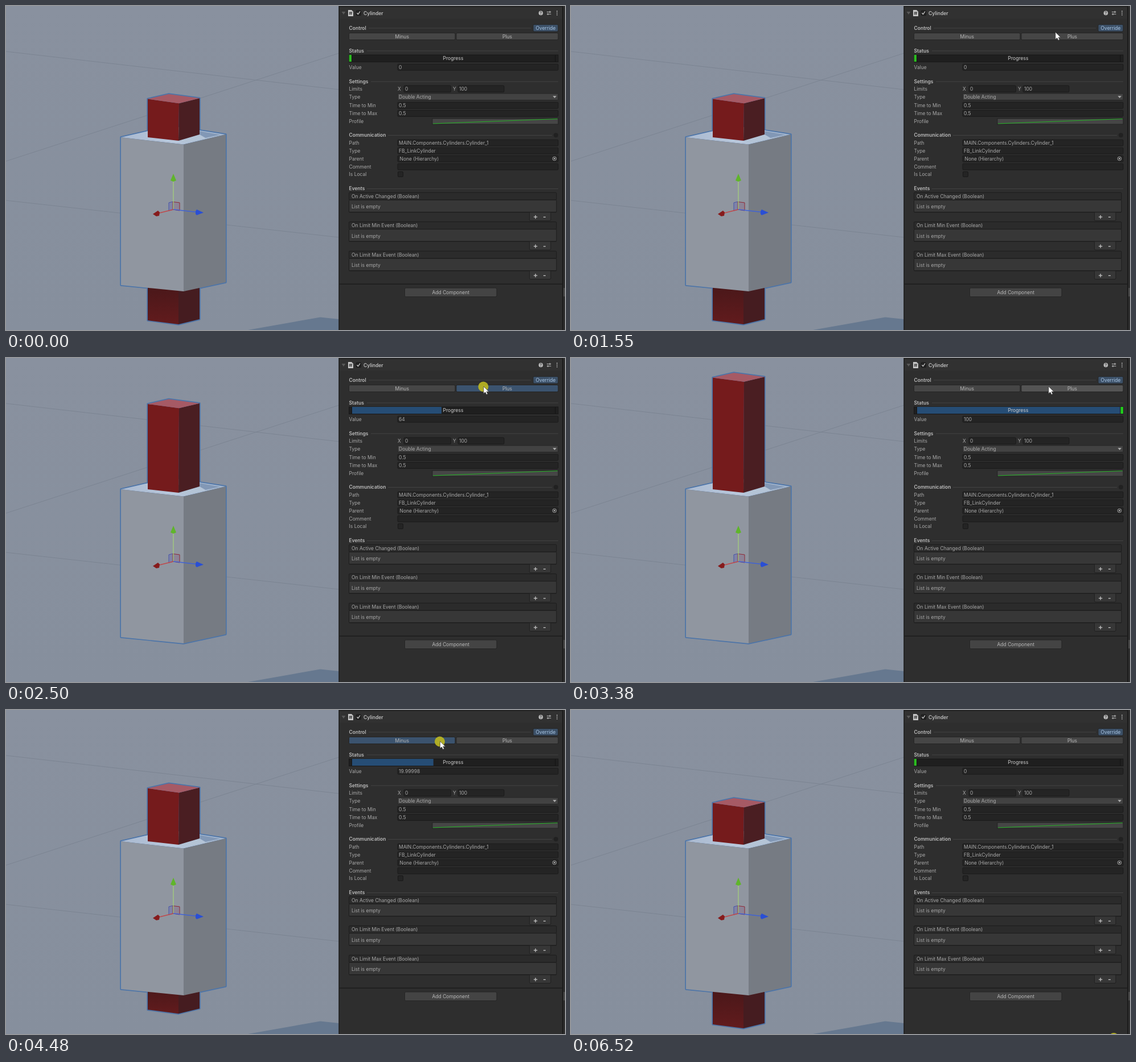
Recreate the animation shown at these times as an HTML page. Size 982 px wide and 570 px high, loop 6.65 s.

```html
<!DOCTYPE html>
<html lang="en">
<head>
<meta charset="utf-8">
<title>Cylinder inspector</title>
<style>
html, body { margin: 0; width: 100%; height: 100%; overflow: hidden; background: #2e2e2e; }
svg { display: block; width: 982px; height: 570px; }
text { font: 8.5px Inter, "Liberation Sans", sans-serif; fill: #a9a9a9; white-space: pre; }
.bold { font-weight: 600; fill: #bdbdbd; }
.mid { text-anchor: middle; }
</style>
</head>
<body>
<svg id="stage" viewBox="0 0 982 570">
  <defs>
    <linearGradient id="sky" x1="0" y1="0" x2="0" y2="1">
      <stop offset="0" stop-color="#89919f"/><stop offset="1" stop-color="#868f9d"/>
    </linearGradient>
    <linearGradient id="rim" x1="0" y1="0" x2="1" y2="0">
      <stop offset="0" stop-color="#a9b9d0"/><stop offset=".5" stop-color="#b9c8dc"/>
      <stop offset="1" stop-color="#9fb2ca"/>
    </linearGradient>
    <linearGradient id="shade" x1="0" y1="0" x2="0" y2="1">
      <stop offset="0" stop-color="#451719"/><stop offset="1" stop-color="#621b1d"/>
    </linearGradient>
  </defs>
  <g id="scene"></g>
  <g id="panel"></g>
  <g id="pointer"></g>
</svg>
<script>
const NS = "http://www.w3.org/2000/svg";
const LOOP = 6650;
const $ = id => document.getElementById(id);
let layer = $("scene");

function add(tag, attrs, label) {
  const el = document.createElementNS(NS, tag);
  for (const k in attrs) el.setAttribute(k, attrs[k]);
  if (label !== undefined) el.textContent = label;
  return layer.appendChild(el);
}
const poly = (points, fill, more) => add("polygon", { points, fill, ...more });
const path = (d, stroke, width = 1, fill = "none") =>
  add("path", { d, stroke, "stroke-width": width, fill });
const fillBox = (x, y, x2, y2, fill) => add("rect", { x, y, width: x2 - x, height: y2 - y, fill });
const box = (x, y, x2, y2, fill, stroke = "#1b1b1b", rx = 1.5) =>
  add("rect", { x: x + .5, y: y + .5, width: x2 - x - 1, height: y2 - y - 1, fill, stroke, rx });
const text = (x, y, s, cls = "") => add("text", { x, y: y + 3.1, class: cls }, s);

// ---- scene ----
const EDGE = "#4c74a8";
const outline = { stroke: EDGE, "stroke-width": 3.4, "stroke-linejoin": "round" };
fillBox(0, 0, 585, 570, "url(#sky)");
path("M0 80L585 147M0 273L585 83M0 342L585 407", "#78818f", .8);
poly("425,570 552,547.5 585,551 585,570", "#66788f");

const rodEdge = poly("", EDGE, outline);
poly("202,231 289,211 386,226 386,486 312,502 202,491", EDGE, outline);
const lowLeft = poly("", "url(#shade)");
const lowRight = poly("", "#451c20");
poly("202,231 289,211 386,226 312,243.5", "url(#rim)");
poly("303,237 340,220 376,226.5 318,239", "#8298b6");
poly("303,237 340,226 352,233 316,240", "#b4c4d6");
poly("202,231 312,243.5 312,502 202,491", "#9096a0");
poly("312,243.5 386,226 386,486 312,502", "#767b83");
const rodLeft = poly("", "#751b1c");
const rodRight = poly("", "#4a1e22");
const rodTop = poly("", "#a65a65");

// move handles
poly("286,346 294,344 294,358 286,360", "#6f75b0", { "fill-opacity": .55, stroke: "#4854a8", "stroke-width": 1 });
poly("293,344.5 305,346 305,360 293,358", "#88708c", { "fill-opacity": .5, stroke: "#8e2734", "stroke-width": 1 });
path("M294 358V307", "#a4cf7c", 1.3);
path("M294 358L268 364.5", "#c0484a", 1.3);
path("M294 358L334 362.5", "#3f62d6", 1.3);
poly("294,295 299,307 294,309 289,307", "#5fb52a");
poly("258,366 267,360 270,363 269,369 264,370", "#861b1c");
poly("347,363.5 335,358 333,361 333,366 335,368", "#2a4fd4");

function drawRod(v) {
  const top = 155 - 1.29 * v, end = 553 - 1.29 * v;
  const a = `249,${top + 8.5}`, b = `304,${top + 16.3 - v * .006}`, c = `340,${top + 7.2}`;
  const back = `286,${top}`;
  const low = Math.max(end, 480);
  rodEdge.setAttribute("points", `${a} ${back} ${c} 340,${low - 2} 303,${low + 7} 249,${low}`);
  rodTop.setAttribute("points", `${a} ${back} ${c} ${b}`);
  rodLeft.setAttribute("points", `${a} ${b} 303,237 249,231`);
  rodRight.setAttribute("points", `${b} ${c} 340,226 303,237`);
  lowLeft.setAttribute("points", `249,480 303,480 303,${low + 7} 249,${low}`);
  lowRight.setAttribute("points", `303,480 340,480 340,${low - 2} 303,${low + 7}`);
}

// ---- inspector ----
layer = $("panel");
fillBox(584.5, 0, 982, 570, "#2e2e2e");
fillBox(584.5, 0, 586, 570, "#1c1c1c");
fillBox(586, 0, 978, 2, "#222");
fillBox(586, 2, 978, 22, "#313131");
fillBox(977, 0, 979, 570, "#1c1c1c");
fillBox(979, 496, 982, 511, "#474747");
fillBox(586, 488.5, 977, 490, "#1c1c1c");

poly("589.5,10 596.5,10 593,15", "#585858");
poly("601,7 607,7 610,10 610,18 601,18", "#c6c6c6");
path("M604.4 9.8L603.8 15.5M607 9.8L606.4 15.5M602.7 11.5H608.3M602.5 13.8H608", "#2e2e2e", .9);
box(614.5, 7.5, 624, 17, "#232323", "#191919");
path("M616.5 12.2L618.5 14.5L622 9.5", "#cfcfcf", 1.3);
text(628, 12.4, "Cylinder", "bold");
add("circle", { cx: 939.5, cy: 12.4, r: 3.8, fill: "#b9b9b9" });
path("M938.2 11.3Q938.3 10 939.5 10Q941 10.1 940.7 11.5L939.5 12.6V13.2M939.5 14V15", "#2e2e2e", .9);
path("M950 10.5H957.5M950 14.2H957.5M955.5 8.7V12.3M952 12.4V16", "#b9b9b9", 1.1);
for (const y of [9.2, 12.4, 15.6]) add("circle", { cx: 968, cy: y, r: .95, fill: "#b9b9b9" });

function section(y, label, from, to) {
  text(602.5, y, label, "bold");
  path(`M${from} ${y + .5}H${to}`, "#424242");
}
section(38.5, "Control", 637, 922);
section(78.5, "Status", 634, 970);
section(132.5, "Settings", 641, 970);
section(227, "Communication", 671, 959);
section(321, "Events", 634, 970);
add("circle", { cx: 966, cy: 227.3, r: 4, fill: "#212121" });

function button(x, y, x2, y2, label, fill = "#464646") {
  const el = box(x, y, x2, y2, fill, "#242424", 2);
  text((x + x2) / 2, (y + y2) / 2, label, "mid").style.fill = "#b9b9b9";
  return el;
}
button(925.5, 32, 970.5, 45.5, "Override", "#3c5067").nextSibling.style.fill = "#a9c6e4";
const minus = button(602, 47, 789.5, 60, "Minus");
const plus = button(790.5, 47, 970.5, 60, "Plus");
button(700, 495.5, 862.5, 512, "Add Component", "#444");

box(602, 85.5, 970.5, 99, "#1f1f1f", "#181818", 0);
const bar = fillBox(608, 86, 965, 98, "#264d75");
fillBox(607, 86, 608, 98, "#151515");
fillBox(964.5, 86, 965.5, 98, "#151515");
const lampMin = fillBox(602.7, 86, 607, 98, "#2bbb20");
const lampMax = fillBox(965.5, 86, 970, 98, "#22cc1c");
text(785.5, 92.3, "Progress", "mid").style.fill = "#cdcdcd";

const label = (y, s) => text(602.5, y, s);
function field(y, name, value, x = 690) {
  label(y, name);
  box(687.5, y - 6, 970.5, y + 6, "#242424");
  return text(x, y, value);
}
const value = field(107.7, "Value", "0");
label(146, "Limits");
text(688, 146, "X");
box(698.5, 139.5, 782, 152, "#242424");
text(701, 146, "0");
text(785, 146, "Y");
box(793.5, 139.5, 875.5, 152, "#242424");
text(796, 146, "100");
label(160, "Type");
box(687.5, 153.5, 970.5, 166, "#424242", "#252525");
text(690, 160, "Double Acting");
poly("960.5,158.3 967,158.3 963.8,162", "#b0b0b0");
field(174.8, "Time to Min", "0.5");
field(188.9, "Time to Max", "0.5");
label(203, "Profile");
box(748.5, 197.5, 970.5, 208.5, "#464646", "#222", 0);
path("M750 207L969 198.5", "#25b325", 1.1);
field(240.7, "Path", "MAIN.Components.Cylinders.Cylinder_1");
field(254.7, "Type", "FB_LinkCylinder");
field(268.7, "Parent", "None (Hierarchy)", 691.5);
add("circle", { cx: 963.5, cy: 268.5, r: 3.3, fill: "none", stroke: "#b0b0b0", "stroke-width": .9 });
add("circle", { cx: 963.5, cy: 268.5, r: 1.4, fill: "#b0b0b0" });
field(282.8, "Comment", "");
label(296, "Is Local");
box(688, 291, 698, 301, "#242424", "#191919");

["On Active Changed (Boolean)", "On Limit Min Event (Boolean)", "On Limit Max Event (Boolean)"].forEach((name, i) => {
  const y = 334.7 + i * 51.5;
  box(602, y - 7, 967.5, y + 7, "#2b2b2b", "#1c1c1c");
  box(602, y + 6, 967.5, y + 28.5, "#373737", "#1c1c1c");
  box(919, y + 27.5, 957.5, y + 43.5, "#373737", "#1f1f1f", 2);
  fillBox(920, y + 27, 956.5, y + 29, "#373737");
  path(`M602.5 ${y + 28}H967`, "#1c1c1c");
  text(607, y, name);
  text(607, y + 18.6, "List is empty");
  path(`M927 ${y + 36.4}H933.4M930.2 ${y + 33.2}V${y + 39.6}M944 ${y + 36.6}H948`, "#c4c4c4", 1.3);
});

// ---- pointer ----
layer = $("pointer");
const dot = add("circle", { r: 9, fill: "#b9b521", "fill-opacity": .93 });
const arrow = path("M0 0V12.6L2.9 10L5 14.3L7.2 13.3L5.2 9.2H9.2Z", "#3a3a3a", .7, "#fff");

// ---- timing ----
// bursts of redraws: first, last, count
const bursts = [
  [0, 0, 1], [260, 810, 8], [1140, 1220, 2], [1550, 1890, 5], [2220, 2780, 9], [3380, 3380, 1],
  [3580, 4190, 9], [4270, 4690, 7], [5090, 5700, 9], [5770, 5910, 3], [6520, 6520, 1]
];
function snap(t) {
  const [a, b, n] = bursts.filter(s => s[0] <= t).pop();
  if (t >= b) return b;
  const step = (b - a) / (n - 1);
  return a + Math.floor((t - a) / step + 1e-6) * step;
}

const out = k => 1 - (1 - k) * (1 - k);
const smooth = k => k * k * (3 - 2 * k);
const line = k => k;
// time, x, y, easing towards this point
const route = [
  [260, 954, 525], [731, 850.5, 50, out], [810, 855, 46, line], [1060, 855, 46, line],
  [1220, 852, 46, line], [1471, 852, 46, line], [1550, 851, 46, line], [1890, 839, 50, smooth],
  [3500, 839, 50, line], [3960, 762.5, 55, smooth], [5120, 762.5, 55, line],
  [5624, 930, 415, smooth], [5700, 923, 462, line], [5770, 929, 502, line], [5840, 935, 543, line]
];
function pointer(t) {
  const i = route.findIndex(p => p[0] >= t);
  if (i < 1) return (i ? route[route.length - 1] : route[0]).slice(1, 3);
  const [t0, x0, y0] = route[i - 1], [t1, x1, y1, ease] = route[i];
  const k = ease((t - t0) / (t1 - t0));
  return [x0 + (x1 - x0) * k, y0 + (y1 - y0) * k];
}

// the stroke advances 4 units on every 20 ms tick
const ticks = t => Math.min(100, Math.max(0, Math.floor(t / 20 + 1e-6) * 4));
const stroke = t => ticks(t - 2180) - ticks(t - 4070);
const show = (el, on) => el.setAttribute("visibility", on ? "visible" : "hidden");

function draw(now) {
  const t = snap(now % LOOP);
  const v = stroke(t), shown = stroke(t - 100);
  drawRod(v);
  value.textContent = t > 4070 && v > 0 ? (v - .00002).toFixed(5) : v;
  bar.setAttribute("width", 3.57 * shown);
  show(lampMin, shown === 0);
  show(lampMax, shown === 100 && v === 100);

  const [x, y] = pointer(t);
  const onPlus = t >= 2180 && t < 3380, onMinus = t >= 4070 && t < 5090;
  const hover = (a, b) => t >= 3380 && y > 46 && y < 60 && x > a && x < b;
  const tint = (down, over) => down ? "#3b536e" : over ? "#545454" : "#464646";
  plus.setAttribute("fill", tint(onPlus, hover(790, 970)));
  minus.setAttribute("fill", tint(onMinus, hover(602, 789)));

  const late = t >= 6520;
  show(arrow, t >= 260 && t < 5910);
  arrow.setAttribute("transform", `translate(${x} ${y})`);
  show(dot, onPlus || onMinus || late);
  dot.setAttribute("cx", late ? 953.5 : x - .5);
  dot.setAttribute("cy", late ? 577 : y + .5);
}

const start = performance.now();
function tick() {
  draw(performance.now() - start);
  requestAnimationFrame(tick);
}
draw(0);
requestAnimationFrame(tick);
</script>
</body>
</html>
```
